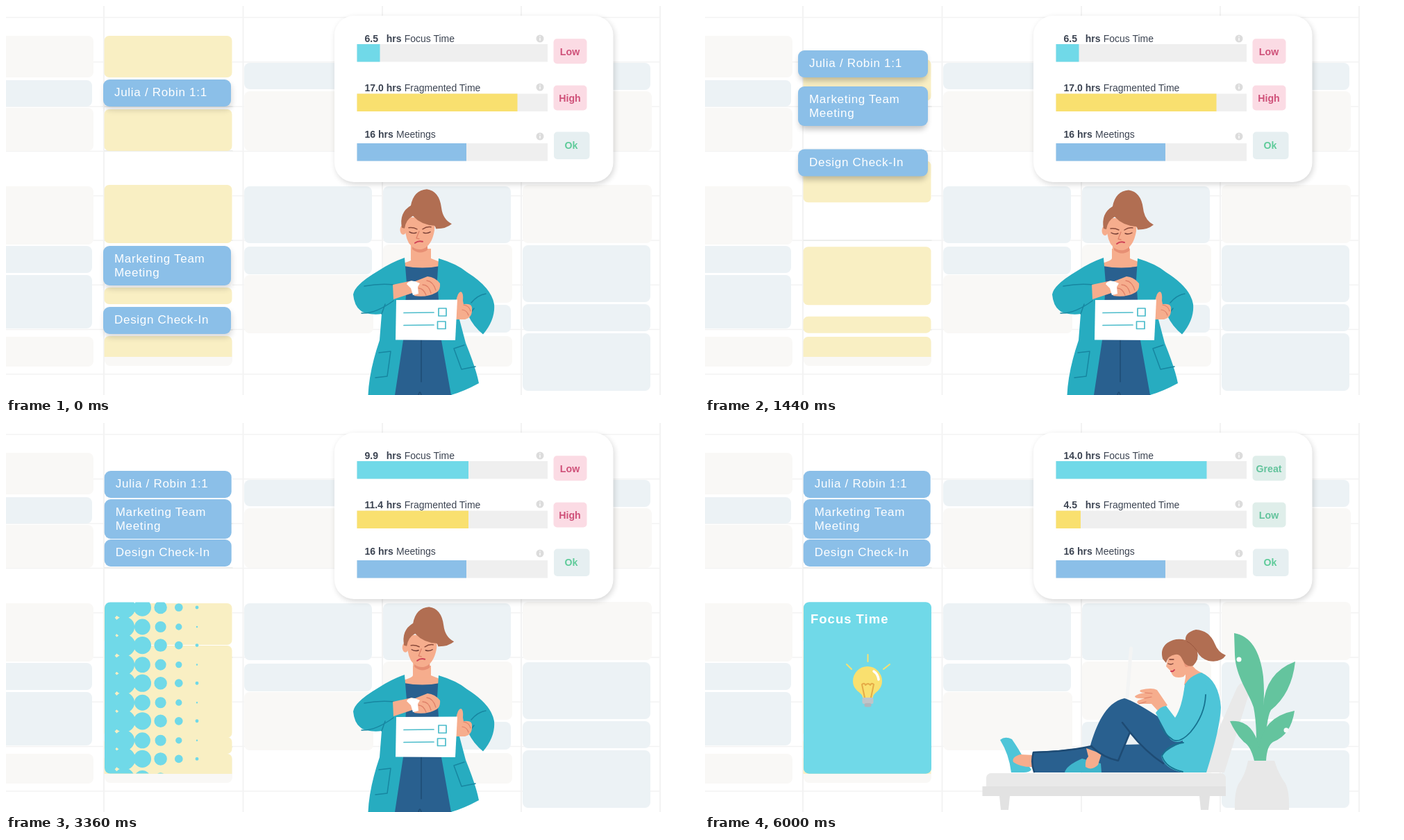
Recreate the animation shown at these times as an HTML page. Size 998 by 561 pixels, loop 9 s.

```html
<!DOCTYPE html>
<html lang="en">
<head>
<meta charset="utf-8">
<title>Calendar focus time</title>
<style>
html, body { margin: 0; width: 100%; height: 100%; overflow: hidden; background: #fff; }
svg { display: block; width: 100%; height: 100%; font-family: "Liberation Sans", Arial, sans-serif; }
.card text { font-size: 17px; letter-spacing: .7px; fill: #fff; }
.stat { font-size: 14px; fill: #3c4452; }
.tag { font-size: 14.2px; font-weight: bold; text-anchor: middle; }
.line { fill: none; stroke-linecap: round; stroke-linejoin: round; }
</style>
</head>
<body>
<svg id="stage" viewBox="0 0 998 561"></svg>
<script>
const LOOP = 9000, STEP = 120, LAST = 6000;
const CREAM = '#f9f8f6', MIST = '#ecf2f5', YELLOW = '#f9e06f', CYAN = '#70d9e8', BLUE = '#8bbfe8';
const SKIN = '#f6ad8d', HAIR = '#b16e52', TEAL = '#27acc0', NAVY = '#29608f', DARK = '#1e4b74';

const rect = (x, y, w, h, fill, r = 0, extra = '') =>
  `<rect x="${x}" y="${y}" width="${w}" height="${h}" rx="${r}" fill="${fill}" ${extra}/>`;
const shape = (d, fill) => `<path d="${d}" fill="${fill}"/>`;
const line = (d, color, width = 1.5) => `<path class="line" d="${d}" stroke="${color}" stroke-width="${width}"/>`;
const group = (id, body, extra = '') => `<g id="${id}" ${extra}>${body}</g>`;

function calendar() {
  let out = '';
  for (let y = 16.5; y < 561; y += 64.3) out += line(`M0 ${y}H942`, '#f3f3f3', 1.5);
  for (const x of [141, 341.5, 542, 742, 942]) out += line(`M${x} 0V561`, '#f3f3f3', 2);
  const columns = [
    [-60, [[43, 60, 0], [107, 38, 1], [147, 62, 0], [260, 84, 0], [346, 39, 1], [388, 77, 1], [477, 43, 0]]],
    [343, [[82, 38, 1], [123, 86, 0], [260, 82, 1], [347, 40, 1], [388, 84, 0]]],
    [543, [[260, 82, 1], [344, 84, 0], [431, 40, 1], [476, 44, 0]]],
    [744, [[82, 39, 1], [123, 86, 0], [258, 84, 0], [345, 82, 1], [430, 39, 1], [472, 83, 1]]]
  ];
  for (const [x, slots] of columns)
    for (const [y, h, busy] of slots) out += rect(x, y, busy ? 184 : 186, h, busy ? MIST : CREAM, 8);
  out += rect(142, 20, 184, 500, '#fff') + rect(142, 477, 184, 42, CREAM, 8);
  for (const y of [145, 209, 338, 467]) out += line(`M142 ${y}H326`, '#e6e8e6', 1.5);
  return out;
}

// y, height, landing y, start and end of the move
const blocks = [
  [43, 60, 260, 1200, 2160], [149, 60, 321, 860, 2137], [258, 84, 370, 831, 1688],
  [406, 24, 453, 750, 1623], [476, 36, 477, 600, 960]
];
// y, height, lifted y, landing y, start and end of the move, text
const cards = [
  [106, 39, 64, 69, 120, 1120, ['Julia / Robin 1:1']],
  [346, 57, 116, 110, 360, 1343, ['Marketing Team', 'Meeting']],
  [434, 39, 168, 168, 629, 1696, ['Design Check-In']]
];

const cardMarkup = ([, h, , , , , rows], i) => group('card' + i,
  rect(2, 5, 183, h, '#000', 9, 'class="shadow" filter="url(#soft)"') +
  rect(0, 0, 184, h, BLUE, 9, 'class="face"') +
  rows.map((s, k) => `<text x="16" y="${24 + 20.4 * k}">${s}</text>`).join(''), 'class="card"');

function focusBlock() {
  return rect(142, 258.5, 184, 247, CYAN, 8) +
    `<text x="152" y="289" font-size="18.5" font-weight="bold" letter-spacing="1" fill="#fff">Focus Time</text>` +
    line('M204 348L211 355M234.5 334V344M266 348L257 355', YELLOW, 2) +
    shape('M227 396C227 388 213 387 213 372A21 21 0 0 1 255 372C255 387 242 388 242 396Z', YELLOW) +
    line('M230 396L226 377Q230 374 231 378Q235 374 238 378Q240 374 243 377L239 396', '#e5ab46', 2) +
    line('M243 358Q249 362 250 370', '#fff', 3.5) +
    rect(226.5, 396, 16, 9, '#bfc5c9', 2) + rect(229.5, 404, 10, 5.5, '#b0b6bb', 2.5);
}

function tag(id, y, pink, green) {
  const face = (cls, fill, color, label) => `<g class="${cls}">` + rect(788.5, y, 48, 36, fill, 5) +
    `<text class="tag" x="812" y="${y + 23.3}" fill="${color}">${label}</text></g>`;
  return group(id, face('before', '#fbdbe4', '#cf5179', pink) + face('after', '#dfeeea', '#62c39c', green)) +
    group(id + 'Rays', line(`M835 ${y + 11}L842 ${y + 5}M837 ${y + 17.5}L846 ${y + 16.5}M835 ${y + 24}L843 ${y + 29}`, '#7fd5df', 1.7));
}

function panel() {
  let out = rect(475, 17, 401, 240, '#000', 28, 'opacity=".16" filter="url(#soft)"') + rect(473, 14, 401.5, 240, '#fff', 28);
  const stats = [[52, 55, 'Focus Time', CYAN], [123, 126.5, 'Fragmented Time', YELLOW], [190, 198, 'Meetings', BLUE]];
  stats.forEach(([base, top, label, color], i) => {
    const fixed = i === 2, hrs = fixed ? 536 : 547.7, icon = [47, 117, 188][i];
    out += `<g class="stat"><text id="num${i}" x="516.5" y="${base}" font-weight="bold">16</text>` +
      `<text x="${hrs}" y="${base}" font-weight="bold">hrs</text><text x="${hrs + 26}" y="${base}">${label}</text></g>` +
      rect(505.5, top, 274.5, 25.5, '#efefef') + rect(505.5, top, 157.5, 25.5, color, 0, `id="bar${i}"`) +
      `<circle cx="769" cy="${icon}" r="5.5" fill="#dcdcdc"/>` +
      line(`M769 ${icon - .5}V${icon + 2.5}M769 ${icon - 3}V${icon - 2.8}`, '#fff', 1.4);
  });
  return out + tag('tag0', 47.2, 'Low', 'Great') + tag('tag1', 114.5, 'High', 'Low') +
    rect(789, 181.5, 51.5, 39.5, '#e6eff1', 5) + '<text class="tag" x="814" y="206" fill="#5fcb9a">Ok</text>';
}

function standing() {
  const crease = '#1786a0';
  const head =
    shape('M587 340H611V368H587Z', SKIN) +
    shape('M589 348Q600 356 611 347V353Q600 361 589 352Z', '#e78f74') +
    shape('M578 306Q577 330 584 343Q592 354 603 352Q617 348 621 325L622 306Z', SKIN) +
    `<ellipse cx="576" cy="324" rx="4.5" ry="7" fill="${SKIN}"/>` +
    shape('M574 321Q570 299 587 289Q591 267 610 265.5Q628 268 631 292Q633 309 646 315.5Q637 323 623 322.5Q623 320 621 318Q602 317 590 304Q580 309 578 322Z', HAIR) +
    line('M584 321Q590 320 596 323M604 323Q610 319 616 320', '#8a4a3a', 1.5) +
    line('M585 327Q590 330 595 328M605 328Q610 330 615 327', '#743d35', 1.4) +
    line('M599 326L595 336L599 337', '#dd8068', 1.3) + line('M593 343Q598 339 604 341', '#cf4156', 2);
  return shape('M586 350H612V364L627 370L622 385H576L572 371Q586 367 586 364Z', SKIN) +
    shape('M573 375Q600 380 625 375L629 482L642 561H556L567 482Z', NAVY) + line('M598 482V542M598 561Q596 553 594 561', DARK, 1.5) +
    shape('M574 363Q554 370 536 382Q502 402 500 416Q502 438 518 443Q531 446 541 444L538 482Q523 526 521.5 561H560L572 482L577 400Z', TEAL) +
    shape('M623 364Q650 372 664 384Q699 406 703 430Q705 452 687 473.5Q673 462 666 447L653 452L662 486Q677 523 681 544Q659 556 641 561L627 482L621 395Z', TEAL) +
    line('M516 404Q538 400 559 402M512 443Q532 444 558 425M541 444L546 430M670 428Q679 417 691 415M666 447L674 436', crease) +
    line('M537 500L554 498L549 534L532 536M645 494L660 489M645 494L656 524L676 520', crease) +
    shape('M557 402L585 396L588 413L558 423Z', SKIN) +
    shape('M584 399Q597 394 607 390Q618 391 625 400Q626 409 620 413Q606 421 588 418Z', SKIN) +
    line('M606 396Q615 397 619 410M600 402Q609 402 612 414M594 407Q601 407 605 417', '#df8169', 1.3) +
    shape('M577 401Q580 395 589 397L596 400L593 405L594 415L586 417L583 407Z', '#fff') +
    shape('M648 427Q650 413 655 412Q659 413 658 425L659 430Q672 428 671 437Q672 449 661 452L647 452Z', SKIN) +
    line('M659 431Q667 432 669 440M657 438Q664 439 666 446', '#df8169', 1.2) +
    shape('M562 424L650 423.5L647 482L561 481.5Z', '#fff') +
    line('M573 442.5L616 442M573 460.5L616 460', '#4cbccb', 1.7) +
    line('M623 436H634V447H623ZM621.5 455H633V465.5H621.5Z', '#4cbccb', 1.7) + group('head1', head);
}

function resting() {
  const GREY = '#e8e8e8', GREEN = '#64c49e', SWEATER = '#4ec5d8';
  const plant =
    shape('M793 487Q796 440 790 410C784 390 764 366 763 334L762 303Q797 309 804 366Q806 392 804 408Q807 360 850 344Q845 390 815 414Q808 425 805 487Z', GREEN) +
    shape('M791 487Q786 466 776 460Q764 448 756 430Q789 427 798 468Q803 424 849 415Q844 450 818 460Q809 466 808 487Z', GREEN) +
    '<circle cx="769" cy="341" r="3.5" fill="#fff"/><circle cx="837" cy="443" r="3.5" fill="#f7f9f9"/>' +
    shape('M782 487H820Q825 505 836 520Q842 532 841 558H763Q762 534 768 521Q778 508 782 487Z', GREY);
  const chair = shape('M712 504L766 382Q771 372 783 375L785 385L748 504Z', '#e9e9e9') +
    rect(405, 505, 345, 25, '#e9e9e9', 7) + rect(399.5, 524, 350.5, 14, '#e2e2e2') +
    shape('M424 538H439L437 558H426ZM712 538H727L725 558H714Z', '#e2e2e2');
  const legs =
    shape('M425 457Q432 451 442 456Q453 472 459 484L470 500Q467 504 459 504H441Q438 478 425 457Z', SWEATER) +
    shape('M474 479L454 478Q441 482 444 489Q455 497 474 496Z', SKIN) +
    shape('M472 474Q520 473 564 465L640 463L694 504H474Q469 490 472 474Z', NAVY) +
    shape('M518 504Q520 494 543 484L570 491L571 504Z', '#3fb5cb') +
    shape('M549 469L571 477L566 493Q557 502 548 496Q547 486 552 481Z', SKIN) +
    shape('M604 397Q623 402 687 447L692 504Q658 500 629 466L612 446L595 487Q576 485 555 465C563 438 576 403 604 397Z', NAVY) +
    line('M601 432L612 446L595 487Q574 483 556 466M612 446Q634 474 660 491M473 475Q520 474 557 466M473 475Q469 490 474 503', DARK, 2.5);
  const head =
    shape('M692 338L700 346Q704 356 717 361Q707 374 690 378L692 367Z', SKIN) +
    shape('M668 335L664 351Q668 355 671 358Q673 370 689 366Q700 355 698 338L687 326Z', SKIN) +
    shape('M690 338L698 347Q700 352 692 352Q688 345 690 338Z', '#ec967a') +
    shape('M659 340Q655 325 666 317Q678 309 692 313Q691 302 707 298Q726 299 734 318Q739 331 750 335Q743 346 725 343Q713 339 709 330Q712 341 703 350Q693 353 688 342Q684 332 677 334Q667 335 664 346Z', HAIR) +
    line('M694 315Q701 318 708 328', '#99573f', 1) +
    line('M667 347Q671 349 674 347M669 341L675 341', '#743d35', 1.3) + line('M671 358Q674 359 676 356', '#cf3d55', 2);
  const hands =
    shape('M650 416L640 405L622 405Q617 403 621 400L630 397Q616 398 616 394Q621 390 631 389Q621 389 624 385Q641 381 648 385L663 407Z', SKIN) +
    line('M630 397L640 395M631 389L641 390M622 405L632 402', '#df8169', 1.2);
  return chair + plant + line('M613.5 325L608 396', '#f3f4f4', 5) + legs + group('head2', head) +
    shape('M690 384Q698 363 715 360Q740 371 743 410Q742 440 722 504H687Q661 498 657 480Q668 468 688 461Z', SWEATER) +
    group('hands', hands) +
    shape('M691 377Q703 358 717 366Q726 380 719 409Q710 443 688 458Q675 464 667 452L649 418Q655 409 664 408L677 425Q687 410 691 377Z', SWEATER) +
    line('M721 392Q720 421 699 446Q684 462 674 457Q660 448 655 432M658 480Q668 463 689 461M658 480Q663 497 688 503', '#16728f', 1.8);
}

const $ = id => document.getElementById(id);
$('stage').innerHTML = `<defs><filter id="soft" x="-20%" y="-60%" width="140%" height="220%"><feGaussianBlur stdDeviation="4"/></filter>
  <clipPath id="slot">${rect(142, 258.5, 184, 247, '#000', 8)}</clipPath>
  <clipPath id="column">${rect(130, 0, 210, 506, '#000')}</clipPath></defs>` +
  calendar() +
  group('blocks', blocks.map(([y, h], i) => rect(141.5, y, 184, h, '#f9efc3', 7, `id="block${i}"`)).join(''), 'clip-path="url(#column)"') +
  `<path id="dots" fill="${CYAN}" clip-path="url(#slot)"/>` + group('focus', focusBlock()) +
  cards.map(cardMarkup).join('') + group('tense', standing()) + group('calm', resting()) + panel();

const set = (el, attrs) => { for (const k in attrs) el.setAttribute(k, attrs[k]); };
const clamp = v => Math.min(1, Math.max(0, v));
const mix = (a, b, p) => a + (b - a) * p;
const smooth = (t, from, to) => { const p = clamp((t - from) / (to - from)); return p * p * (3 - 2 * p); };
const along = (t, keys) => {
  const i = keys.findIndex(k => k[0] >= t);
  if (i < 1) return keys[i < 0 ? keys.length - 1 : 0][1];
  const [t0, a] = keys[i - 1], [t1, b] = keys[i];
  return mix(a, b, (t - t0) / (t1 - t0));
};

function dotPath(p) {
  if (!p) return '';
  const edge = mix(142, 480, p);
  let d = '';
  for (let row = 0; row < 10; row++) {
    const y = 266 + 54.6 * (row >> 1) + row % 2 * 28;
    for (let x = 144; x < 345; x += 26.2) {
      const r = .13 * (edge - x) - row % 2 * 1.2;
      if (r > 0) d += `M${x - r} ${y}a${r} ${r} 0 1 0 ${2 * r} 0a${r} ${r} 0 1 0 ${-2 * r} 0Z`;
    }
  }
  return d;
}

function draw(t) {
  const lift = smooth(t, 0, 480), settle = smooth(t, 1740, 2040);
  blocks.forEach(([y, , end, from, to], i) => set($('block' + i), { y: mix(y, end, smooth(t, from, to)) }));
  cards.forEach(([y, , up, end, from, to], i) => {
    const top = mix(mix(y, up, smooth(t, from, to)), end, settle), el = $('card' + i);
    set(el, { transform: `translate(${mix(mix(140, 134, lift), 141.7, settle)} ${top})` });
    set(el.querySelector('.face'), { width: mix(184 + 3 * lift, 183, settle) });
    set(el.querySelector('.shadow'), { opacity: mix(.15 + .08 * lift, 0, settle) });
  });

  const p = smooth(t, 2400, 4460);
  set($('dots'), { d: dotPath(p) });
  set($('focus'), { opacity: smooth(t, 4200, 4500) });
  $('num0').textContent = mix(6.5, 14, p).toFixed(1);
  $('num1').textContent = mix(17, 4.5, p).toFixed(1);
  set($('bar0'), { width: along(t, [[2280, 33], [2400, 40.5], [3360, 160.5], [4320, 217]]) });
  set($('bar1'), { width: along(t, [[2280, 231], [2400, 224], [3360, 160.5], [4320, 35.5]]) });

  const done = t >= 4320, pulsing = t >= 4440 && t < 5760, u = pulsing ? (t - 4440) / 660 % 1 : 0;
  [65, 132.5].forEach((cy, i) => {
    const el = $('tag' + i), s = 1 + .1 * Math.sin(Math.PI * u);
    set(el, { transform: `translate(812.5 ${cy}) scale(${s}) translate(-812.5 ${-cy})` });
    set(el.querySelector('.before'), { opacity: done ? 0 : 1 });
    set(el.querySelector('.after'), { opacity: done ? 1 : 0 });
    set($('tag' + i + 'Rays'), { opacity: pulsing ? Math.min(1, 1.3 * (1 - u)) : 0, transform: `translate(${20 * u} 0)` });
  });

  const swap = smooth(t, 4080, 4320);
  set($('tense'), { opacity: 1 - swap });
  set($('calm'), { opacity: swap });
  const sway = along(t, [[0, -4], [600, 0], [1440, 0], [2400, -.8], [4400, -.8]]);
  set($('head1'), { transform: `translate(${sway} ${sway * .3})` });
  const wave = period => 1 - Math.cos(2 * Math.PI * (LAST - t) / period);
  set($('head2'), { transform: `translate(${wave(2880)} ${wave(2880) * .3})` });
  set($('hands'), { transform: `translate(${3 - 1.5 * wave(960)} 0)` });
}

function tick(now) {
  draw(Math.min(LAST, Math.floor(now % LOOP / STEP) * STEP));
  requestAnimationFrame(tick);
}
draw(0);
requestAnimationFrame(tick);
</script>
</body>
</html>
```
